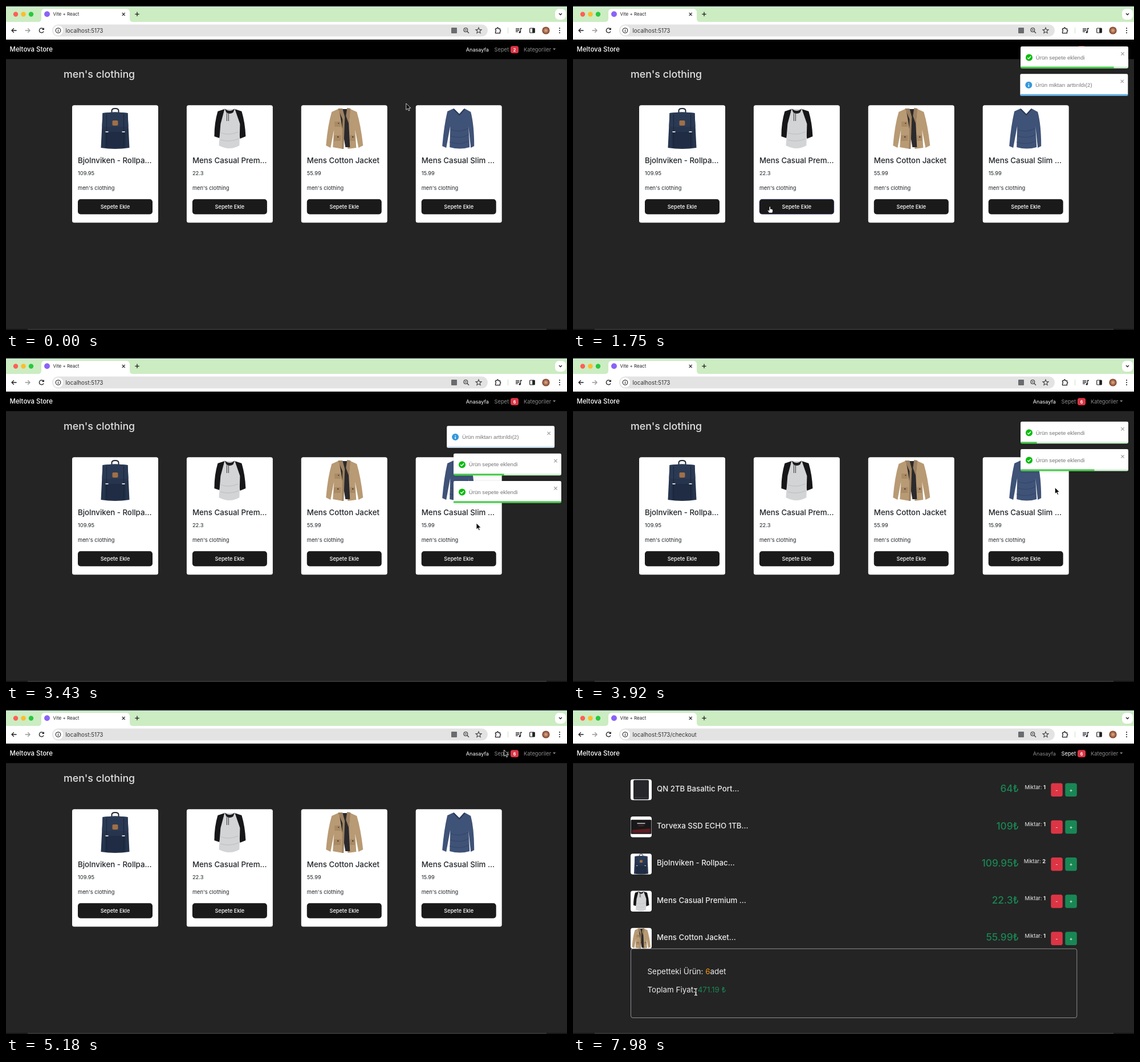
An HTML page that plays this animation: 984 px wide and 569 px high, repeating every 8 s.

```html
<!DOCTYPE html>
<html lang="tr">
<head>
<meta charset="utf-8">
<title>Shop cart</title>
<style>
html, body { margin: 0; height: 100%; overflow: hidden; background: #242424; }
svg { display: block; width: 100vw; height: 100vh; font-family: Inter, "Open Sans", sans-serif; }
text { white-space: pre; }
.line { fill: none; stroke: #1f1f1f; stroke-width: 1.3; }
.toast text { font-family: "Liberation Sans", sans-serif; }
</style>
</head>
<body>
<svg id="stage" viewBox="0 0 984 569" preserveAspectRatio="none"></svg>
<script>
const LOOP = 8000, CHECKOUT = 5950;
const ENTER = 539, BAR = 1540, COLLAPSE = 231, ZOOM = 0.593;

const rect = (x, y, w, h, fill, r = 0, more = '') =>
  `<rect x="${x}" y="${y}" width="${w}" height="${h}" rx="${r}" fill="${fill}" ${more}/>`;
const circle = (x, y, r, fill, more = '') => `<circle cx="${x}" cy="${y}" r="${r}" fill="${fill}" ${more}/>`;
const text = (x, y, size, fill, s, more = '') =>
  `<text x="${x}" y="${y}" font-size="${size}" fill="${fill}" ${more}>${s}</text>`;
const path = (d, fill, more = '') => `<path d="${d}" fill="${fill}" ${more}/>`;
const line = (d, more = '') => `<path class="line" d="${d}" ${more}/>`;
const group = (s, more = '') => `<g ${more}>${s}</g>`;
const MID = 'text-anchor="middle"', END = 'text-anchor="end"', MEDIUM = 'font-weight="500"';

// Product pictures, centred on 0,0 and 72 units high
const pictures = {
  pack: line('M-6 -26V-31Q-6 -35 0 -35Q6 -35 6 -31V-26', 'style="stroke:#1c2535;stroke-width:2"') +
    path('M-22 -27Q0 -30 22 -27L25 34Q0 38 -25 34Z', '#26344d') +
    path('M-22 -27Q0 -30 22 -27L23 -3H-23Z', '#2b3a54') +
    rect(-18, 6, 36, 28, '#1f2c43', 2) + line('M-15 -25V33M15 -25V33', 'style="stroke:#18243a;stroke-width:1"') +
    rect(-5, -14, 10, 9, '#a06f47', 2) + rect(-17, 5, 5, 2, '#d8d5cc') + rect(12, 5, 5, 2, '#d8d5cc'),
  raglan: path('M-9 -34L-21 -30Q-27 -10 -27 14L-18 17L-14 -8ZM9 -34L21 -30Q27 -10 28 14L18 18L14 -8Z', '#17171a') +
    path('M-9 -34H9L18 -8L17 30Q0 40 -19 30L-16 -8Z', '#d3d4d6') +
    path('M-9 -35Q0 -27 9 -35L6 -28Q0 -24 -6 -28Z', '#1c1c1f') +
    line('M-5 -27V-13M-2 -27V-13', 'style="stroke:#333;stroke-width:1"') +
    line('M-15 8Q0 13 15 6M-16 20Q0 25 16 18', 'style="stroke:#bcbdc1;stroke-width:1"'),
  jacket: path('M-11 -34L-22 -29Q-29 -6 -32 30L-24 34L-18 2L-20 33L-3 36V-30ZM11 -34L22 -29Q29 -6 33 30L25 34L19 2L21 34L6 36V-30Z', '#b89a74') +
    path('M-9 -34H10L8 -8L10 33H2Z', '#2b2a2c') + path('M-11 -35L-3 -35L1 -20L-1 36H-4L-3 -16ZM11 -35L5 -36L3 -22L8 -8Z', '#9d8161') +
    rect(-17, -12, 11, 9, '#a88a65') + rect(-18, 12, 12, 10, '#a88a65') + rect(10, 12, 9, 10, '#a88a65') +
    circle(-11, 15, 1.2, '#4a3927') + circle(-10, -9, 1, '#4a3927') + circle(15, 15, 1.2, '#4a3927'),
  sweater: path('M-9 -35L-20 -30Q-26 -5 -29 31L-22 34L-15 -4L-16 33Q2 38 19 33L17 -4L21 34L27 31Q27 -6 21 -29L10 -35L1 -25Z', '#3f5277') +
    line('M-9 -34L1 -24L10 -34', 'style="stroke:#2a3858;stroke-width:2"') +
    line('M-14 2Q2 8 16 0M-15 13Q2 19 17 11M-16 24Q2 30 18 22', 'style="stroke:#354668;stroke-width:1.2"'),
  drive: rect(-27, -34, 54, 68, '#25272b', 4) + rect(-25, 26, 50, 5, '#303338', 2),
  ssd: rect(-36, -25, 72, 50, '#18181a', 3) + rect(-14, -14, 28, 4, '#a5a5a7') +
    rect(-10, -5, 20, 2, '#7c2a2c') + path('M-32 11L32 6V21H-32Z', '#5f1c21')
};
const picture = (name, x, y, scale = 1) =>
  group(pictures[name], `transform="translate(${x} ${y}) scale(${scale})"`);

function browser() {
  const star = 'M829 38L830.4 41.4L834 41.7L831.2 44L832.1 47.6L829 45.6L825.9 47.6L826.8 44L824 41.7L827.6 41.4Z';
  return rect(0, 0, 984, 28, '#ccecc2') + rect(0, 0, 984, 1, '#343a63') + rect(0, 28, 984, 31, '#fff') +
    ['#fe5f57', '#febc2e', '#28c840'].map((c, i) => circle(17 + 13.5 * i, 14.5, 4.2, c)).join('') +
    path('M56 28Q62 28 62 22V11Q62 5 68 5H211Q217 5 217 11V22Q217 28 223 28Z', '#fff') +
    circle(72, 14.3, 5, '#8a63f6') + text(82.5, 17, 8, '#222', 'Vite + React') +
    line('M203.7 11.9L208.7 16.9M208.7 11.9L203.7 16.9M226.3 14.3H233.7M230 10.6V18') +
    rect(963, 5, 19, 19, '#fff', 7) + line('M970 13L972.5 15.5L975 13') +
    line('M18.5 43H10M13.8 39.2L10 43L13.8 46.8') +
    line('M33.5 43H42M38.2 39.2L42 43L38.2 46.8', 'style="stroke:#999"') +
    line('M65.6 40.6A4 4 0 1 0 66 44.6M66.2 38.4V41.3H63.3') +
    rect(81, 32.5, 764, 21, '#e2e3e2', 10.5) + circle(91.5, 43, 8.7, '#fff') +
    circle(91.5, 43, 4.3, 'none', 'stroke="#222" stroke-width="1.1"') + line('M91.5 42.4V45.3M91.5 40.4V41.5') +
    rect(781, 38, 10, 10, '#696c6f', 1) +
    circle(806.3, 42, 3.4, 'none', 'stroke="#444" stroke-width="1.2"') + line('M808.8 44.5L812 47.7M804.8 42H807.8', 'style="stroke:#444"') +
    line(star, 'style="stroke:#444;stroke-width:1.1"') +
    line('M858.5 39.8H861V39Q862.3 37 863.6 39V39.8H866.5V42.3Q869 43.4 866.5 44.8V47.6H858.5V45Q860.8 43.6 858.5 42.2Z') +
    rect(880, 38, 1, 10, '#cbe3c3') +
    line('M894 39.8H900.5M894 42.5H900.5M894 45.2H898M902.5 46V39.5H905') + circle(901.2, 46, 1.7, '#222') +
    rect(918.7, 39, 8.6, 8, 'none', 1, 'stroke="#222" stroke-width="1.2"') + rect(923.2, 39, 4, 8, '#222') +
    circle(947, 43, 6.6, 'url(#avatar)') +
    [39, 43, 47].map(y => circle(971, y, 1.1, '#222')).join('') +
    rect(0, 59, 984, 34.3, '#000') + text(6.5, 80, 11.4, '#fff', 'Meltova Store', MEDIUM) +
    rect(0, 567, 984, 2, '#161616') + rect(38, 567.5, 910, 0.8, '#5a5a5a');
}

const CARDS = [
  ['pack', 'Bjolnviken - Rollpa...', '109.95'], ['raglan', 'Mens Casual Prem...', '22.3'],
  ['jacket', 'Mens Cotton Jacket', '55.99'], ['sweater', 'Mens Casual Slim ...', '15.99']
];
const cardX = i => 116 + 200.9 * i;

function home() {
  return text(101, 126, 17.8, '#e2e2e2', "men's clothing", MEDIUM) + CARDS.map(([pic, name, price], i) => {
    const x = cardX(i);
    return rect(x, 174.3, 151, 206.3, '#fff', 3.5) + picture(pic, x + 75.5, 215) +
      text(x + 10, 275.8, 13.3, '#212529', name, MEDIUM) + text(x + 10, 296.6, 9.3, '#212529', price) +
      text(x + 10, 323.3, 9.3, '#212529', "men's clothing") +
      rect(x + 10, 339.3, 131, 26.4, '#1a1a1a', 4.8, 'class="buy" stroke="#646cff" stroke-opacity="0" stroke-width=".6"') +
      text(x + 75.5, 355.9, 9.2, '#fff', 'Sepete Ekle', MID + ' ' + MEDIUM);
  }).join('');
}

const ROWS = [
  ['drive', 'QN 2TB Basaltic Port...', 64, 1], ['ssd', 'Torvexa SSD ECHO 1TB...', 109, 1],
  ['pack', 'Bjolnviken - Rollpac...', 109.95, 2], ['raglan', 'Mens Casual Premium ...', 22.3, 1],
  ['jacket', 'Mens Cotton Jacket...', 55.99, 1]
];

function checkout() {
  const stepper = (x, y, fill, sign) =>
    rect(x, y, 20.5, 23.6, fill, 3.5) + text(x + 10.2, y + 15.2, 9.3, '#fff', sign, MID);
  const rows = ROWS.map(([pic, name, price, count], i) => {
    const y = 121.7 + 65.25 * i;
    return rect(101, y, 37, 36.5, '#fff', 4) + picture(pic, 119.5, y + 18.2, 0.5) +
      text(147, y + 21.2, 13.25, '#ececec', name, MEDIUM) +
      text(782, y + 22.6, 17.2, '#198754', price + '₺', END + ' ' + MEDIUM) +
      text(829, y + 17, 9.2, '#ececec', `Miktar: <tspan font-weight="700">${count}</tspan>`, END) +
      stepper(838.3, y + 6.8, '#dc3545', '-') + stepper(863.3, y + 6.8, '#198754', '+');
  }).join('');
  return rows + rect(101.5, 419.3, 782.3, 121.2, '#242424', 3.5, 'stroke="#a9abad" stroke-width=".8"') +
    text(130.5, 464.3, 13.4, '#ececec', 'Sepetteki Ürün: <tspan fill="#fd9a14">6</tspan>adet') +
    text(130.5, 495.8, 13.4, '#ececec', 'Toplam Fiyat: <tspan fill="#198754">471.19 ₺</tspan>');
}

function nav() {
  return text(806.8, 79.5, 9.1, '#fff', 'Anasayfa', 'id="homeLink"') +
    text(856.5, 79.5, 9.3, '#fff', 'Sepet', 'id="cartLink"') +
    rect(885, 70.3, 14, 12.8, '#dc3545', 3.5) + text(892, 79.5, 7.2, '#fff', '2', 'id="badge" font-weight="700" ' + MID) +
    text(908, 79.5, 9.3, '#8c8c8c', 'Kategoriler') + path('M959 74.6H964.4L961.7 77.3Z', '#8c8c8c');
}

const ADDED = { color: '#07bc0c', label: 'Ürün sepete eklendi', sign: 'M-2.8 .2L-.8 2.2L3 -2' };
const MORE = { color: '#3498db', label: 'Ürün miktarı arttırıldı(2)', sign: 'M0 -3.2V-1.8M0 -.6V3.2' };
const TOASTS = [[1006, ADDED], [1245, MORE], [2075, ADDED], [2898, ADDED]];

const toast = ([, { color, label, sign }]) => group(
  rect(0, 0, 189, 38.5, '#fff', 2.4, 'filter="url(#shadow)"') + rect(0, 35.5, 189, 3, color, 1, 'opacity=".2"') +
  rect(0, 35.5, 189, 3, color, 1, 'class="bar" opacity=".7"') + circle(15, 19.5, 6, color) +
  line(sign, 'transform="translate(15 19.5)" style="stroke:#fff;stroke-width:1.5"') +
  text(26.8, 22.8, 9.65, '#757575', label) +
  line('M176.3 10.2L181.7 15.6M181.7 10.2L176.3 15.6', 'style="stroke:#999;stroke-width:1.1"'), 'class="toast"');

const stage = document.getElementById('stage');
stage.innerHTML = `<defs>
  <radialGradient id="avatar"><stop offset="0" stop-color="#e3b28b"/><stop offset="1" stop-color="#7a3b25"/></radialGradient>
  <filter id="shadow" x="-10%" y="-30%" width="120%" height="160%"><feDropShadow dx="0" dy=".6" stdDeviation="2.4" flood-opacity=".15"/></filter>
  </defs>` + rect(0, 0, 984, 569, '#242424') + browser() + text(104.5, 46.5, 9.8, '#333', '', 'id="url"') +
  group(home(), 'id="home"') + group(checkout(), 'id="checkout"') + nav() + TOASTS.map(toast).join('') +
  group(
    path('M0 0V11.2L2.6 8.8L4.4 12.8L6.2 12L4.5 8.1H8Z', '#000', 'stroke="#fff" stroke-width=".8"') +
    path('M-1.2 1Q0 -1 1.2 1V4.4Q3 3.6 3.4 5Q5 4.4 5.3 6V8.4Q5 9.6 4.4 11.4H-1.6Q-2.6 9 -4.2 7.2Q-3.6 5.6 -1.2 7.2Z', '#fff', 'stroke="#000" stroke-width=".8"') +
    path('M-2.5 -6Q0 -6 0 -4Q0 -6 2.5 -6M0 -4V4M-2.5 6Q0 6 0 4Q0 6 2.5 6M-1.5 2H1.5', 'none', 'stroke="#fff" stroke-width="1.1"'),
    'id="cursor"');

const $ = id => document.getElementById(id);
const toasts = [...document.querySelectorAll('.toast')], bars = [...document.querySelectorAll('.bar')];
const buys = [...document.querySelectorAll('.buy')], shapes = [...$('cursor').children];

const clamp = v => Math.min(1, Math.max(0, v));
const mix = (a, b, p) => a + (b - a) * p;
const outCubic = p => 1 - (1 - p) ** 3;
const smooth = p => p * p * (3 - 2 * p);
const show = (el, on) => el.style.display = on ? '' : 'none';

function along(keys, t, ease) {
  const i = keys.findIndex(k => k[0] >= t);
  if (i < 0) return keys[keys.length - 1].slice(1);
  if (!i) return keys[0].slice(1);
  const a = keys[i - 1], b = keys[i], p = ease((t - a[0]) / (b[0] - a[0]));
  return a.slice(1).map((v, n) => mix(v, b[n + 1], p));
}

const BOUNCE = [[0, 3000], [0.6, -25], [0.75, 10], [0.9, -5], [1, 0]];
const PATH = [
  [0, 702, 171], [70, 690, 178], [210, 540, 240], [350, 320, 312], [490, 140, 350], [590, 90, 356], [700, 140, 354],
  [770, 164, 352], [1400, 164, 352], [1540, 220, 350], [1750, 345, 352], [1890, 380, 353], [2170, 382, 353],
  [2310, 440, 350], [2450, 519.5, 344.5], [2590, 556, 350], [2700, 575, 352], [2980, 577, 352], [3150, 680, 336],
  [3430, 825, 290], [3700, 838, 262], [4000, 848, 215], [4200, 856, 166], [4300, 864, 60], [4360, 868, -20],
  [5050, 872, -20], [5110, 872, 18], [5180, 873.5, 70], [5320, 874, 73], [5530, 874, 75], [6400, 874, 75],
  [6600, 740, 92], [6800, 480, 135], [7000, 210, 185], [7210, 30, 232], [7350, 36, 262], [7500, 80, 345],
  [7650, 160, 430], [7790, 236, 478], [7900, 222, 491], [7980, 215.5, 495]
];

function drawToasts(t) {
  let y = 71;
  TOASTS.forEach(([start], i) => {
    const end = start + ENTER + BAR, gone = end + ENTER;
    const p = clamp((t - start) / ENTER), q = clamp((t - end) / ENTER), fly = clamp((q - 0.2) / 0.8);
    const leave = q < 0.2 ? -20 * smooth(q / 0.2) : mix(-20, 2000, 1 - (1 - fly) ** 2);
    const x = 785 + ZOOM * (along(BOUNCE, p, outCubic)[0] + leave);
    show(toasts[i], t >= start && t < gone);
    toasts[i].setAttribute('transform', `translate(${x} ${y})`);
    toasts[i].setAttribute('opacity', outCubic(clamp(p / 0.6)) * (1 - fly));
    bars[i].setAttribute('width', 189 * (1 - clamp((t - start - ENTER) / BAR)));
    y += 48.35 * (1 - smooth(clamp((t - gone) / COLLAPSE)));
  });
}

function draw(t) {
  const paid = t >= CHECKOUT, fade = clamp((t - CHECKOUT) / 130);
  const [x, y] = along(PATH, t, p => p);
  const onCart = x > 856 && x < 900 && y > 68 && y < 88 && t >= 5320;
  let hand = onCart;
  buys.forEach((b, i) => {
    const over = !paid && y > 339 && y < 366 && x > cardX(i) + 10 && x < cardX(i) + 141;
    hand = hand || over;
    b.setAttribute('stroke-opacity', over ? 0.6 : 0);
  });
  const beam = paid && y > 484 && x < 270;
  [!hand && !beam, hand, beam].forEach((on, i) => show(shapes[i], on));
  $('cursor').setAttribute('transform', `translate(${x} ${y})`);

  show($('home'), !paid);
  show($('checkout'), paid);
  $('url').textContent = 'localhost:5173' + (paid ? '/checkout' : '');
  $('homeLink').setAttribute('fill-opacity', mix(1, 0.55, smooth(fade)));
  const idle = onCart ? mix(0.55, 0.75, clamp((t - 5320) / 115)) : 0.55;
  $('cartLink').setAttribute('fill-opacity', paid ? mix(0.75, 1, fade) : idle);
  $('badge').textContent = 2 + TOASTS.filter(([start]) => t >= start).length;
  drawToasts(t);
}

function tick() {
  draw(performance.now() % LOOP);
  requestAnimationFrame(tick);
}
tick();
</script>
</body>
</html>
```
